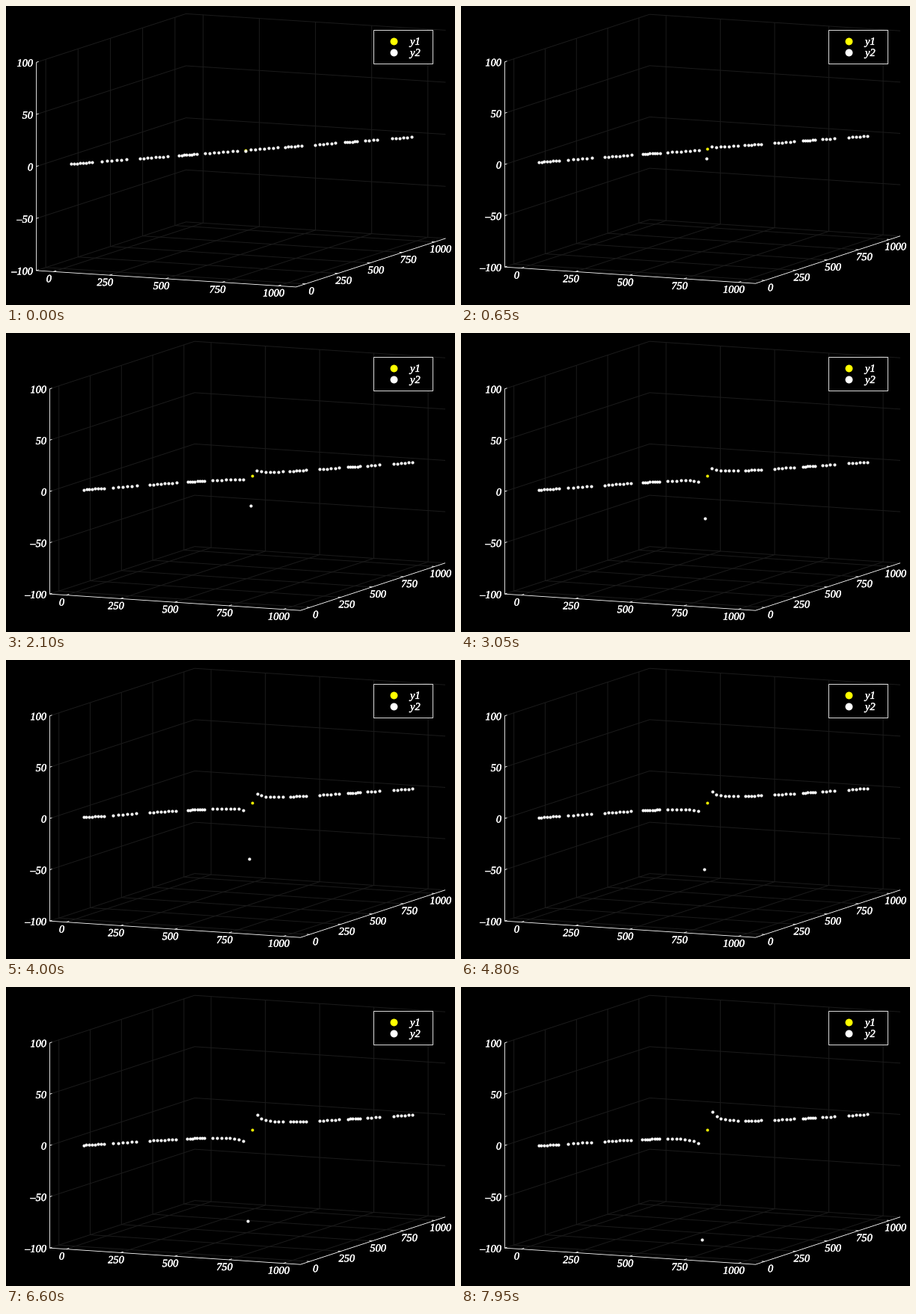
These frames come from a looping animation (600x400 px, 8 s). A matplotlib script:

```python
import numpy as np
import matplotlib.pyplot as plt
from matplotlib.animation import FuncAnimation
from matplotlib.collections import LineCollection
from matplotlib.patches import Rectangle
from matplotlib import patheffects

W, H, DPI = 600, 400, 100
PX = 72 / DPI
FRAMES, STEP = 160, 50
WHITE, GRID = "white", "#1b1b1b"
THIN = 0.85 * PX

XLIM, YLIM, ZLIM = (-76, 1079), (-73, 1085), (-100, 100)
TICKS = range(0, 1001, 250)
ZTICKS = range(-100, 101, 50)

CENTRE = 516.6
SPEED = 0.39     # height gained per step at unit distance
TILT = 0.135     # sideways drift per unit of height

# Evenly filled runs along the diagonal: first, last, count
RUNS = ((24, 83, 8), (111, 179, 6), (217, 295, 8), (328, 378, 8),
        (401, 492, 8), (530, 606, 7), (627, 674, 6), (713, 770, 6),
        (797, 831, 6), (853, 888, 4), (930, 984, 6))
INNER = CENTRE - 0.34
RING = np.concatenate([np.linspace(*run) for run in RUNS] + [[INNER]])
LIFT = SPEED * np.sign(RING - CENTRE) / np.sqrt(np.abs(RING - CENTRE))


class View:
    """Parallel projection of the data box onto the stage."""

    def __init__(self, corner, xvec, yvec, height):
        self.corner = np.array(corner, float)
        self.axes = ((XLIM, np.array(xvec)), (YLIM, np.array(yvec)),
                     (ZLIM, np.array((0, -height))))

    def __call__(self, *xyz):
        p = self.corner
        for v, ((lo, hi), vec) in zip(xyz, self.axes):
            p = p + ((np.asarray(v) - lo) / (hi - lo))[..., None] * vec
        return p


VIEWS = (View((40.5, 353.9), (347, 22), (200, -65), 278.5),
         View((58.5, 349.2), (335, 22), (193.5, -63.5), 274.5))

fig = plt.figure(figsize=(W / DPI, H / DPI), dpi=DPI, facecolor="black")
ax = fig.add_axes([0, 0, 1, 1])
ax.set_xlim(0, W)
ax.set_ylim(H, 0)
ax.axis("off")

THICKEN = [patheffects.withStroke(linewidth=0.3, foreground=WHITE)]


def label(x, y, s, ha="center", va="center_baseline"):
    return ax.text(x, y, s, color=WHITE, ha=ha, va=va, fontsize=14.4 * PX,
                   family="Liberation Serif", style="italic",
                   path_effects=THICKEN)


def lines(segs, color, width, z):
    c = LineCollection(segs, colors=color, linewidths=width, zorder=z)
    return ax.add_collection(c)


def build_axes(view):
    (x0, x1), (y0, y1), (z0, z1) = XLIM, YLIM, ZLIM
    grid, frame, texts = [], [], []

    def path(*pts):
        return [view(*p) for p in pts]

    for t in TICKS:
        grid.append(path((t, y0, z0), (t, y1, z0), (t, y1, z1)))
        grid.append(path((x1, t, z0), (x0, t, z0), (x0, t, z1)))
        frame.append(path((t, y0, z0), (t, y0 + 22, z0)))
        frame.append(path((x1, t, z0), (x1 - 13, t, z0)))
        px, py = view(t, y0, z0)
        texts.append(label(px - 6, py + 9, str(t)))
        px, py = view(x1, t, z0)
        texts.append(label(px + 8, py + 9, str(t)))
    for t in ZTICKS:
        grid.append(path((x0, y0, t), (x0, y1, t), (x1, y1, t)))
        frame.append(path((x0, y0, t), (x0, y0 + 18, t)))
        px, py = view(x0, y0, t)
        texts.append(label(px - 4.3, py + 0.5,
                           str(t).replace("-", "\u2013"), "right"))
    frame.append(path((x0, y0, z1), (x0, y0, z0), (x1, y0, z0), (x1, y1, z0)))
    return [lines(grid, GRID, PX, 1), lines(frame, WHITE, THIN, 2)] + texts


def dots(pts, color, size, z):
    return ax.scatter(*np.transpose(pts), s=(size * PX) ** 2, c=color,
                      linewidths=0, zorder=z)


def build_legend():
    ax.add_patch(Rectangle((490.5, 31.5), 79, 45, facecolor="black",
                           edgecolor=WHITE, linewidth=THIN, zorder=6))
    for y, color, name in ((47.3, "yellow", "y1"), (62.4, WHITE, "y2")):
        dots([(518.2, y)], color, 9.9, 7)
        label(540, y + 4.6, name, "left", "baseline").set_zorder(7)


sets = [build_axes(v) for v in VIEWS]
build_legend()
star = dots([(0, 0)], "yellow", 3.9, 4)
ring = dots(np.zeros((len(RING), 2)), WHITE, 4.1, 5)


def update(i):
    now = min(i, 1)
    for k, group in enumerate(sets):
        for artist in group:
            artist.set_visible(k == now)
    view = VIEWS[now]
    z = LIFT * (i + 1)
    u = RING + TILT * z
    star.set_offsets([view(CENTRE, CENTRE, 0)])
    ring.set_offsets(view(u, u, z))
    return [star, ring]


anim = FuncAnimation(fig, update, frames=FRAMES, interval=STEP,
                     repeat=True, repeat_delay=0, blit=False)
plt.show()
```
